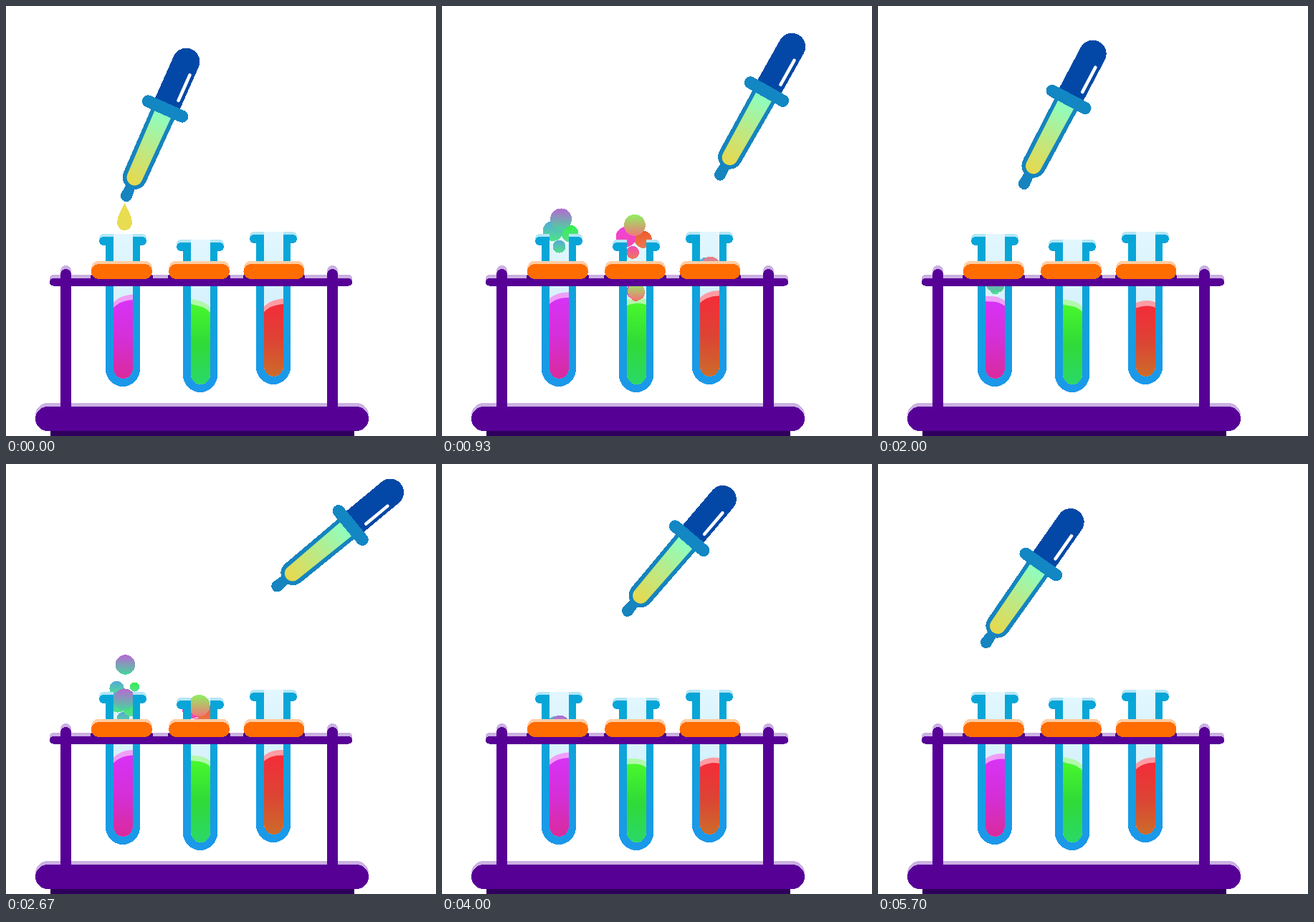
An HTML page for the animation above (5.73 s loop, 600 px wide and 600 px high).

```html
<!DOCTYPE html>
<html lang="en">
<head>
<meta charset="utf-8">
<title>Test tubes</title>
<style>
html, body { margin: 0; width: 100%; height: 100%; overflow: hidden; background: #fff; }
svg { display: block; width: 100vw; height: 100vh; shape-rendering: crispEdges; }
.smooth { shape-rendering: geometricPrecision; }
</style>
</head>
<body>
<svg id="stage" viewBox="0 0 600 600"></svg>
<script>
const LOOP = 5730, CYCLE = LOOP / 3, TAU = 2 * Math.PI;
const stage = document.getElementById('stage');

// slosh: the surface tilts by mean + swing * cos, waves times per cycle
const tubes = [
  { x: 0, y: 0, drop: 0, lean: 0, light: '#ef9ff8', liquid: ['#d832f6', '#d42fd6', '#da2a9c'],
    level: 406, swell: 2, slosh: { waves: 10, mean: -2, swing: -9 },
    bubbles: [['#b868d4', '#48d49c'], ['#58a6da', '#4ce488'], ['#30f048', '#5cdc94'], ['#58a8d8', '#50e088']] },
  { x: 108, y: 8, drop: 428, lean: -6, light: '#b2f8ac', liquid: ['#48f82c', '#30da38', '#2ad868'],
    level: 412, swell: 2, slosh: { waves: 3, mean: 6, swing: 7 },
    bubbles: [['#90f060', '#f07878'], ['#ee40e4', '#f848a8'], ['#f05a28', '#ec7850'], ['#f04cb8', '#f07858']] },
  { x: 210, y: -3, drop: 760, lean: 0, light: '#ff9ca4', liquid: ['#f42c3a', '#dc4434', '#cc6c2a'],
    level: 408, swell: 6, slosh: { waves: 8, mean: -5, swing: -6 },
    bubbles: [['#f07880', '#78b4e8'], ['#3cb0e4', '#98cdf0'], ['#6858cc', '#58a4e8'], ['#70c0ec', '#7868cc']] }
];

// Key poses: the dropper lifts and tilts between the tubes
const poses = [
  { t: 0, x: 168, y: 265, tilt: 24 },
  { t: 90, x: 204, y: 248, tilt: 27.8 },
  { t: 180, x: 259, y: 205, tilt: 40.4 },
  { t: 290, x: 286, y: 180, tilt: 50 },
  { t: 430, x: 274, y: 265, tilt: 24 },
  { t: 660, x: 395, y: 152, tilt: 50 },
  { t: 760, x: 378, y: 172, tilt: 50 },
  { t: 850, x: 378, y: 262, tilt: 24 },
  { t: 930, x: 388, y: 236, tilt: 29.2 },
  { t: 1110, x: 371, y: 220, tilt: 32.8 },
  { t: 1640, x: 188, y: 181, tilt: 47 },
  { t: 1880, x: 151, y: 249, tilt: 35 },
  { t: CYCLE, x: 168, y: 265, tilt: 24 }
];

const fizz = [
  { dx: 3, r: 15, height: 132, time: 760 },
  { dx: -9, r: 14, height: 99, time: 560 },
  { dx: 16, r: 12, height: 101, time: 660 },
  { dx: 0, r: 9, height: 84, time: 700 }
];
const waves = [{ delay: 0, end: 830 }, { delay: 425, end: 695 }];

const clamp = v => Math.max(0, Math.min(1, v));
const mix = (a, b, u) => a + (b - a) * u;

// Smooth curve through the poses, at rest over the first tube
function poseAt(t) {
  const i = poses.findIndex((p, k) => k && t < p.t) - 1;
  const [before, a, b, after] = [-1, 0, 1, 2].map(k => poses[i + k]);
  const span = b.t - a.t, u = (t - a.t) / span;
  const slope = (p, q, key) => p && q ? 0.8 * span * (q[key] - p[key]) / (q.t - p.t) : 0;
  return ['x', 'y', 'tilt'].map(key =>
    mix(a[key], b[key], u * u * (3 - 2 * u))
    + slope(before, b, key) * u * (1 - u) ** 2
    - slope(a, after, key) * u * u * (1 - u));
}

const gradient = (id, colors) =>
  `<linearGradient id="${id}" x2="0" y2="1">${colors.map((c, i) =>
    `<stop offset="${i / (colors.length - 1)}" stop-color="${c}"/>`).join('')}</linearGradient>`;
const rect = (x, y, w, h, r, fill) =>
  `<rect x="${x}" y="${y}" width="${w}" height="${h}" rx="${r}" fill="${fill}"/>`;

const defs = gradient('wall', ['#06a8d6', '#12a0de', '#1c98ea'])
  + gradient('glass', ['#e2f7ff', '#c8ecf8'])
  + gradient('serum', ['#8cffc2', '#bce986', '#e8d84c'])
  + tubes.map((t, i) => gradient('liquid' + i, t.liquid)
    + t.bubbles.map((b, j) => gradient(`bubble${i}${j}`, b)).join('')).join('');

const rim = (y, fill) =>
  `<path fill="${fill}" d="M150 ${y}H136a6 6 0 0 0 0 12h14zM177 ${y}h13a6 6 0 0 1 0 12h-13z"/>`;

function tubeMarkup(t, i) {
  const circles = waves.map((w, k) => fizz.map((b, j) =>
    `<circle id="b${i}${k}${j}" fill="url(#bubble${i}${j})"/>`).reverse().join('')).join('');
  return `<g transform="translate(${t.x} ${t.y})">
    <path fill="url(#glass)" d="M150 318h27v188a13.5 13.5 0 0 1-27 0z"/>
    <path id="back${i}" class="smooth" fill="${t.light}"/>
    ${circles}
    <path id="drop${i}" fill="#e8dc50" d="M0-21C4-12 10.5-3 10.5 6a10.5 11 0 0 1-21 0C-10.5-3-4-12 0-21z"/>
    <path id="front${i}" class="smooth" fill="url(#liquid${i})"/>
    ${rim(318, '#b4e6f5')}
    <path fill="url(#wall)" d="M139 328h11v178a13.5 14 0 0 0 27 0V328h10v179a24 24 0 0 1-48 0z"/>
    ${rim(322, '#08a5d8')}
  </g>`;
}

const PURPLE = '#570096', LILAC = '#cbb0e2';
const post = x => rect(x, 362, 15, 30, 7.5, LILAC) + rect(x, 367, 15, 200, 7.5, PURPLE);
const clip = x => rect(x - 1, 375, 87, 6, 3, '#4a0088')
  + rect(x, 355.5, 85, 21, 10.5, '#ffcda4') + rect(x, 360, 85, 21, 10.5, '#ff6c00');

const rack = rect(41, 554, 465, 34, 17, LILAC)
  + rect(61, 375, 422, 11, 5, LILAC) + post(76) + post(448)
  + rect(61, 380, 422, 10.5, 5, PURPLE)
  + rect(62, 588, 424, 14, 3, '#2e005c') + rect(41, 559, 465, 34, 17, PURPLE)
  + [119, 227, 331.5].map(clip).join('');

// The dropper's tip sits at the local origin and its axis points up
const dropper = `<g id="dropper">
  <path fill="#0348a6" d="M-19-133v-72a19 19 0 0 1 38 0v72z"/>
  <path class="smooth" stroke="#fff" stroke-width="4.5" stroke-linecap="round" d="M12.2-151V-190"/>
  <path fill="#1584bf" d="M-8 0a8 8 0 0 0 16 0L7-13Q17-18 17-30L18-133H-18L-17-30Q-17-18-7-13z"/>
  <path class="smooth" fill="url(#serum)" d="M-12.5-127h25L11-28a11 11 0 0 1-22 0z"/>
  ${rect(-34.5, -141.5, 69, 17, 8.5, '#1287c3')}
</g>`;

stage.innerHTML = `<defs>${defs}</defs>${tubes.map(tubeMarkup).join('')}${rack}${dropper}`;
const el = {};
stage.querySelectorAll('[id]').forEach(node => el[node.id] = node);

function liquidPath(level, tilt) {
  const left = level - tilt / 2, right = level + tilt / 2;
  return `M150 ${left}C157 ${level - 2} 167 ${level - 5} 177 ${right}V506a13.5 14 0 0 1-27 0z`;
}

function drawTube(t, i, phase) {
  const turn = TAU * phase / CYCLE;
  const tilt = t.slosh.mean + t.slosh.swing * Math.cos(t.slosh.waves * turn);
  const level = t.level - t.y + t.swell * Math.cos(turn);
  el['back' + i].setAttribute('d', liquidPath(level, tilt));
  el['front' + i].setAttribute('d', liquidPath(level + 7.5, tilt));

  const age = (phase - t.drop + CYCLE) % CYCLE, fall = age / 75;
  el['drop' + i].setAttribute('transform', `translate(165.5 ${296 - t.y + 110 * fall * fall})`);
  el['drop' + i].style.display = fall < 1 ? '' : 'none';

  waves.forEach((wave, k) => fizz.forEach((b, j) => {
    const s = age - wave.delay, circle = el[`b${i}${k}${j}`];
    const rise = Math.sin(clamp(s / b.time) * Math.PI / 2);
    const grow = s < 60 ? 0 : mix(0.7, 1, clamp(s / 300));
    const shrink = clamp((wave.end - 15 * j - s) / 80);
    circle.setAttribute('cx', 163.5 + (b.dx + t.lean) * rise);
    circle.setAttribute('cy', 412 - b.height * rise);
    circle.setAttribute('r', b.r * grow * shrink);
  }));
}

// 30 pictures a second, with the second of every six left out
function stepTime(t) {
  const frame = Math.min(5, Math.floor((t % 200 + 4) * 0.03));
  return t - t % 200 + (frame === 1 ? 0 : frame / 0.03);
}

function draw(ms) {
  const phase = stepTime(ms % LOOP) % CYCLE;
  const [x, y, tilt] = poseAt(phase);
  el.dropper.setAttribute('transform', `translate(${x} ${y}) rotate(${tilt})`);
  tubes.forEach((t, i) => drawTube(t, i, phase));
}

const began = performance.now();
function tick() {
  draw(performance.now() - began);
  requestAnimationFrame(tick);
}
tick();
</script>
</body>
</html>
```
